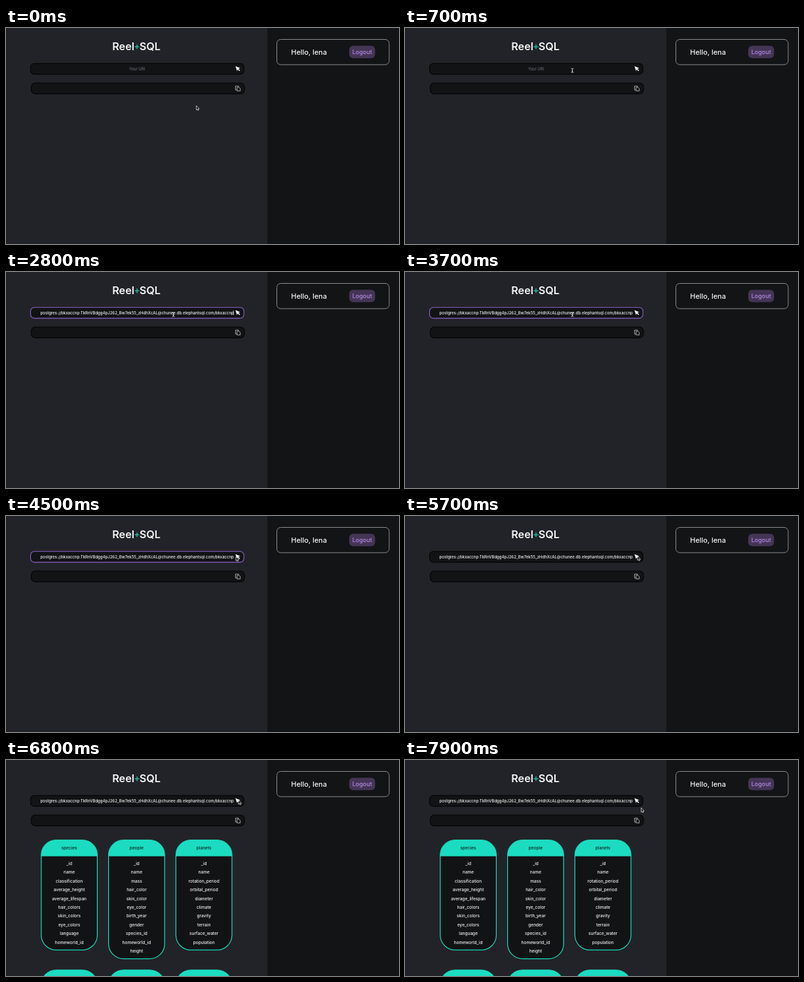
Animation, 600 px wide and 331 px high, one loop 8000 ms. Source, as an HTML page:

```html
<!DOCTYPE html>
<html lang="en">
<head>
<meta charset="utf-8">
<title>Reel+SQL</title>
<style>
  html, body { margin: 0; width: 100%; height: 100%; overflow: hidden; background: #222328; }
  svg { display: block; }
  text { font-family: Inter, "Open Sans", sans-serif; font-weight: 500; fill: #f4f4f4; white-space: pre; }
  .mid { text-anchor: middle; }
  .logo { font-size: 16.2px; font-weight: 600; }
  .plus { font-size: 14px; font-weight: 600; fill: #1db99d; }
  .logout { font-size: 9px; fill: #b58ae6; }
  .hint { font-size: 5.9px; font-weight: 400; fill: #77787c; }
  .field { fill: #121315; stroke: #020203; stroke-width: 1.1; }
  .card text { font-size: 6.5px; }
  .card .title { fill: #10221f; }
</style>
</head>
<body>
<svg width="600" height="331">
  <defs>
    <clipPath id="menuClip"><rect x="38" y="75" width="186.5" height="19"/></clipPath>
  </defs>
  <rect width="399" height="331" fill="#222328"/>
  <rect x="399" width="201" height="331" fill="#131416"/>

  <text class="logo" x="196" y="33.8" text-anchor="end">Reel</text>
  <text class="plus mid" x="200" y="33">+</text>
  <text class="logo" x="203.8" y="33.8">SQL</text>

  <rect x="413.5" y="17.5" width="171.5" height="38.7" rx="6" fill="none" stroke="#8c8c8e"/>
  <text x="435.3" y="40.8" font-size="10.9">Hello, lena</text>
  <rect x="524" y="27.3" width="39.5" height="19" rx="6" fill="#443556"/>
  <text class="logout mid" x="543.7" y="40">Logout</text>

  <rect id="input" class="field" x="37.5" y="54.2" width="325.7" height="16.7" rx="6"/>
  <text id="hint" class="hint mid" x="200" y="64.6">Your URI</text>
  <text id="uri" class="mid" x="200.2" y="64.5" font-size="6"></text>
  <rect id="caret" y="59" width=".8" height="7" fill="#d8d8d8"/>
  <path d="M350.3 58.6 357.6 61.4 354.8 62.4 357.4 65 356.3 66.1 353.7 63.5 352.8 66Z" fill="#fff"/>

  <rect class="field" x="38.6" y="84.3" width="325.4" height="16.6" rx="6"/>
  <g fill="none" stroke="#c8c8c8" stroke-width=".8" stroke-linejoin="round">
    <path d="M352.8 95H350.4V89H355V90.6"/>
    <path d="M352.8 90.8H355.6L357.6 92.6V96.4H352.8Z"/>
  </g>

  <g id="menu">
    <rect x="38" y="75" width="191" height="19" rx="2" fill="#1b1c1f"/>
    <text id="option" x="42" y="85.2" font-size="5.45" font-weight="600" clip-path="url(#menuClip)"></text>
  </g>

  <g id="cards"></g>

  <g id="pointer">
    <path id="arrow" d="M0 0V6.6L1.5 5.3 2.5 7.4 3.5 6.9 2.6 4.9H4.5Z" fill="#111" stroke="#f2f2f2" stroke-width=".7"/>
    <path id="beam" d="M-1.8-3.2Q0-3.2 0-2Q0-3.2 1.8-3.2M0-2.4V2.4M-1.8 3.2Q0 3.2 0 2Q0 3.2 1.8 3.2M-1 1H1" fill="none" stroke="#eee" stroke-width=".8"/>
  </g>
</svg>
<script>
const $ = id => document.getElementById(id);
const user = "bkxaccnp";
const uri = `postgres://${user}:TkRnVBdgg4pJ262_Bw7ek55_zHdhXcAL@chunee.db.elephantsql.com/${user}`;
$("uri").textContent = $("option").textContent = uri;

const tables = {
  species: "_id name classification average_height average_lifespan hair_colors skin_colors eye_colors language homeworld_id",
  people: "_id name mass hair_color skin_color eye_color birth_year gender species_id homeworld_id height",
  planets: "_id name rotation_period orbital_period diameter climate gravity terrain surface_water population"
};

function card(x, y, title, rows) {
  const w = 85.6, r = 23, step = 13.48, h = 33.8 + rows.length * step;
  const label = (s, dy, cls = "") =>
    `<text class="mid ${cls}" x="${w / 2}" y="${dy}">${s}</text>`;
  return `<g class="card" transform="translate(${x} ${y})">
    <rect width="${w}" height="${h}" rx="${r}" fill="#121315" stroke="#1bdcc0" stroke-width="1.2"/>
    <path d="M0 25V${r}A${r} ${r} 0 0 1 ${r} 0H${w - r}A${r} ${r} 0 0 1 ${w} ${r}V25Z" fill="#1bdcc0"/>
    ${label(title, 14.9, "title")}
    ${rows.map((s, i) => label(s, 38 + i * step)).join("")}</g>`;
}

$("cards").innerHTML = Object.entries(tables).map(([title, list], i) => {
  const x = 53.8 + i * 102.8, rows = list.split(" ");
  return card(x, 122.6, title, rows) + card(x, 321.8, "", rows);
}).join("");

// pointer stops: time, x, y
const path = [
  [0, 290.6, 119], [100, 288, 115], [400, 268, 82], [700, 255.5, 65.2],
  [4200, 255.5, 65.2], [4300, 285, 64], [4500, 351, 62.2], [4900, 355, 61.4],
  [7400, 355, 61.4], [7900, 360.6, 73.2], [8000, 360.6, 73.2]
];

function pointerAt(t) {
  const i = path.findIndex(p => p[0] > t);
  const [t0, x0, y0] = path[i - 1], [t1, x1, y1] = path[i];
  const k = (t - t0) / (t1 - t0);
  return [x0 + (x1 - x0) * k, y0 + (y1 - y0) * k];
}

const show = (id, on) => $(id).style.display = on ? "" : "none";
const within = (t, a, b) => t >= a && t < b;

function draw() {
  const t = Math.floor(performance.now() % 8000 / 100) * 100;
  const filled = t >= 2700;
  const focus = t < 5700 ? Math.min(1, Math.max(0, (t - 800) / 300)) : 0;
  $("input").style.stroke = `color-mix(in srgb, #8c60cc ${focus * 100}%, #020203)`;
  show("hint", !filled);
  show("uri", filled);
  show("menu", within(t, 1700, 2700));
  show("cards", t >= 5800);

  $("caret").setAttribute("x", filled ? 346.8 : 200.2);
  show("caret", [[900, 1400], [1900, 2400], [2700, 3300], [3800, 4300]].some(([a, b]) => within(t, a, b)));

  const [x, y] = pointerAt(t);
  const typing = within(y, 54, 71) && x < 349;
  $("pointer").setAttribute("transform", `translate(${x} ${y})`);
  show("beam", typing);
  show("arrow", !typing);
  requestAnimationFrame(draw);
}
draw();
</script>
</body>
</html>
```
